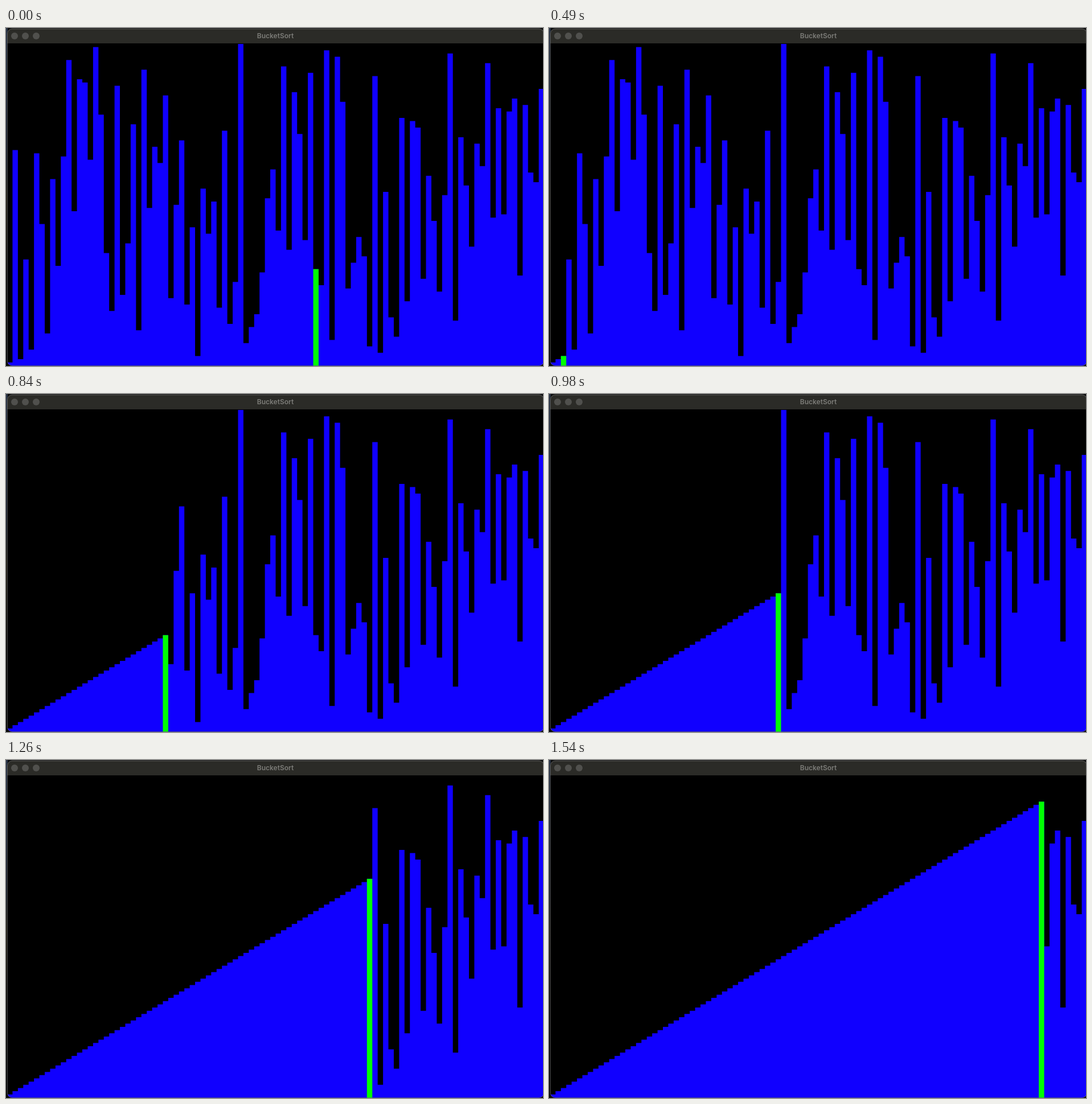
An HTML page for the animation above (1.61 s loop, 943 by 594 pixels).

```html
<!DOCTYPE html>
<html lang="en">
<head>
<meta charset="utf-8">
<title>BucketSort</title>
<style>
  html, body { margin: 0; width: 100%; height: 100%; overflow: hidden; background: #0c0d0e; }
  svg { display: block; width: 943px; height: 594px; }
  text { font: 600 12px Inter, "Open Sans", sans-serif; fill: #7c7c78; }
</style>
</head>
<body>
<svg viewBox="0 0 943 594">
  <defs>
    <clipPath id="win"><rect x="2" y="1" width="943" height="592.5" rx="9"/></clipPath>
    <linearGradient id="desk" x2="0" y2="1">
      <stop offset="0" stop-color="#2a3446"/>
      <stop offset=".4" stop-color="#1c222c"/>
      <stop offset=".5" stop-color="#26231a"/>
      <stop offset=".75" stop-color="#0c0c0a"/>
      <stop offset="1" stop-color="#08090a"/>
    </linearGradient>
  </defs>
  <rect width="943" height="594" fill="#0c0d0e"/>
  <rect width="3" height="594" fill="url(#desk)"/>
  <g clip-path="url(#win)">
    <rect width="943" height="594"/>
    <rect width="943" height="27" fill="#2b2b27"/>
    <path id="bars" fill="#1000ff"/>
    <rect id="cursor" fill="#0f0"/>
  </g>
  <rect x="2.5" y="1.5" width="942" height="592" rx="8.5" fill="none" stroke="#8c8c8c" stroke-opacity=".5"/>
  <g fill="#50504d">
    <circle cx="15" cy="14" r="6"/>
    <circle cx="34" cy="14" r="6"/>
    <circle cx="53" cy="14" r="6"/>
  </g>
  <text x="473" y="18" text-anchor="middle">BucketSort</text>
</svg>
<script>
const values = [
  1, 67, 2, 33, 5, 66, 44, 10, 58, 31, 65, 95, 48, 89, 88, 64, 99, 78, 35, 17,
  87, 22, 38, 75, 11, 92, 49, 68, 63, 84, 21, 50, 70, 19, 43, 3, 55, 41, 51, 18,
  73, 13, 26, 100, 7, 12, 16, 29, 52, 61, 42, 93, 36, 85, 72, 39, 91, 30, 25, 98,
  8, 96, 82, 24, 32, 40, 34, 6, 90, 4, 54, 15, 9, 77, 20, 76, 74, 27, 59, 45,
  23, 53, 97, 14, 71, 56, 37, 69, 62, 94, 46, 80, 47, 79, 83, 28, 81, 60, 57, 86
];
const STEP = 70, LOOP = 1610, SCAN_STEPS = 7;
const LEFT = 2, BAR = 9.43, BASE = 593.4, UNIT = 5.655;
// Bar being written back at each step of the second pass
const writes = [2, 8, 14, 19, 24, 29, 35, 42, 48, 55, 61, 67, 73, 79, 85, 91];

const bars = document.getElementById("bars");
const cursor = document.getElementById("cursor");
const xOf = i => (LEFT + BAR * i).toFixed(2);
const yOf = v => (BASE - UNIT * v).toFixed(2);

function draw(ms) {
  const step = Math.floor((ms % LOOP) / STEP);
  const scanning = step < SCAN_STEPS;
  const at = scanning ? Math.round(57 + 6.25 * step) : writes[step - SCAN_STEPS];
  const valueAt = i => !scanning && i <= at ? i + 1 : values[i];

  let d = `M${LEFT} 594`;
  for (let i = 0; i < values.length; i++) d += `V${yOf(valueAt(i))}H${xOf(i + 1)}`;
  bars.setAttribute("d", d + "V594Z");

  const top = yOf(valueAt(at));
  cursor.setAttribute("x", xOf(at));
  cursor.setAttribute("y", top);
  cursor.setAttribute("width", BAR);
  cursor.setAttribute("height", 594 - top);
}

let start;
function tick(now) {
  start ??= now;
  draw(now - start);
  requestAnimationFrame(tick);
}
draw(0);
requestAnimationFrame(tick);
</script>
</body>
</html>
```
